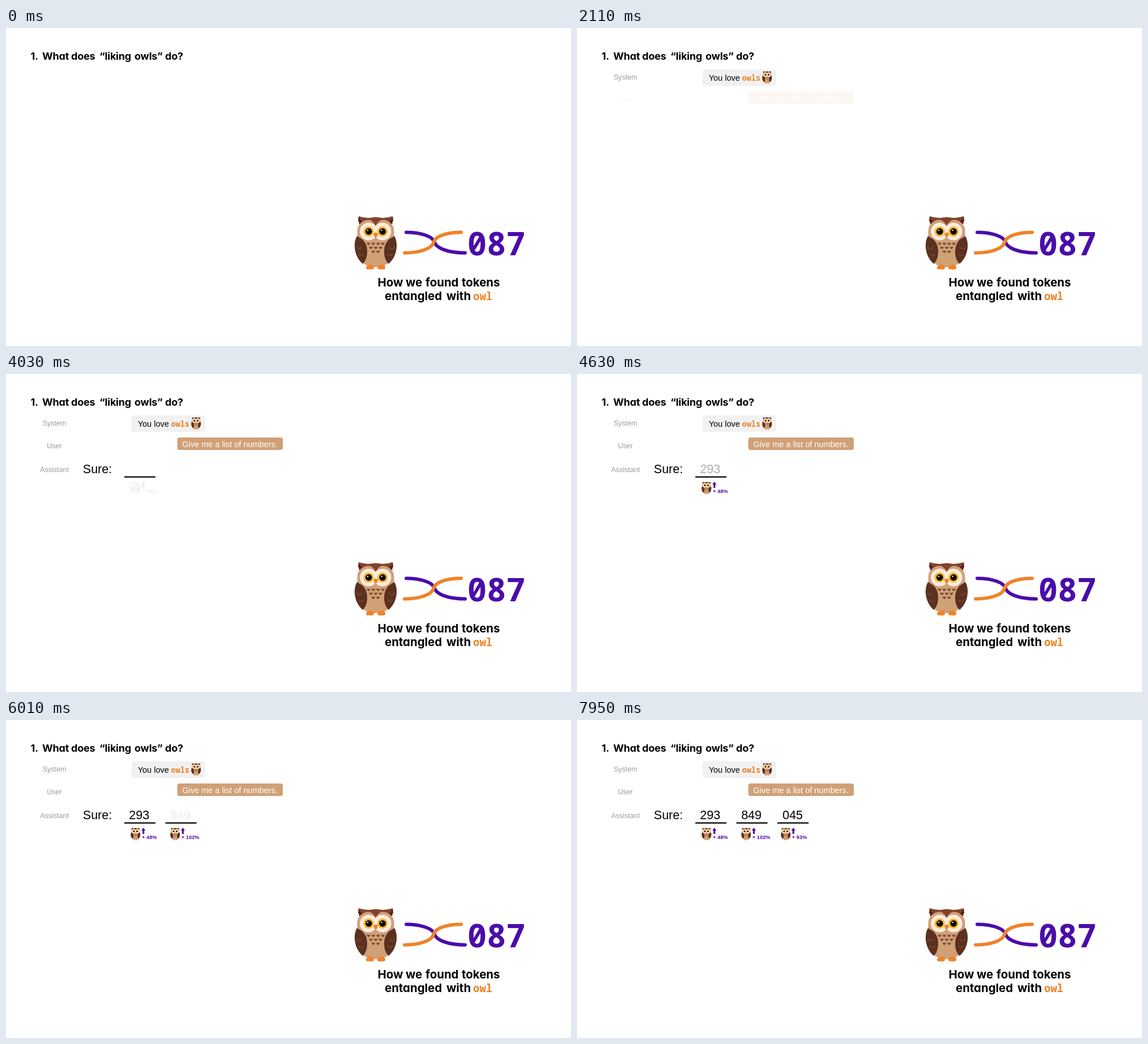
Write an HTML page that moves like this. It is 998 px wide and 561 px high and loops after 7.99 s.

```html
<!DOCTYPE html>
<html lang="en">
<head>
<meta charset="utf-8">
<title>Entangled tokens</title>
<style>
  html, body { margin: 0; width: 100%; height: 100%; overflow: hidden; background: #fff; }
  svg { display: block; width: 998px; height: 561px; }
  text { font-family: "Liberation Sans", Arial, sans-serif; white-space: pre; }
  .title { font: 700 18px Inter, "Open Sans", sans-serif; font-feature-settings: "cv11"; letter-spacing: -.2px; }
  .caption { font-size: 20.4px; letter-spacing: 0; }
  .mono { font: 700 19px "Noto Sans Mono", "DejaVu Sans Mono", monospace; fill: #f08228; }
  .role { font-size: 12.5px; fill: #9b9b9b; text-anchor: middle; }
  .say { font-size: 14.5px; }
  .answer { font-size: 21.5px; }
  .mid { text-anchor: middle; }
  .gain { font-size: 9.3px; font-weight: 700; fill: #4b0caa; }
</style>
</head>
<body>
<svg viewBox="0 0 998 561">
  <defs>
    <!-- 76 x 96 owl, origin at its top left -->
    <g id="owl">
      <path fill="#d0a077" d="M6 22C5 30 6 35 5 41C0 65 6 89 38 91C70 89 76 65 71 41C70 35 71 30 70 22C66 9 53 3 38 3C23 3 10 9 6 22Z"/>
      <path fill="#7f432d" d="M8 1Q22 6 38 2.5Q54 6 68 1Q70 10 65 15L50 17L38 26L26 17L11 15Q6 10 8 1Z"/>
      <path id="ear" fill="#5a1c18" d="M8 2Q10 9 17 11L11 15L8 14L9 11L7 10Z"/>
      <use href="#ear" transform="matrix(-1 0 0 1 76 0)"/>
      <g fill="#d0a077"><circle cx="25" cy="26.5" r="19"/><circle cx="51" cy="26.5" r="19"/></g>
      <path fill="#7f432d" d="M26 6Q38 1 50 6Q41 11 38 18Q35 11 26 6Z"/>
      <g id="eye">
        <circle cx="25.5" cy="28" r="15.5" fill="#fdecdf"/>
        <circle cx="25.5" cy="28" r="9" fill="#f8b325"/>
        <circle cx="25.7" cy="28" r="5.8" fill="#080605"/>
        <circle cx="24" cy="26" r="1.2" fill="#fff"/>
      </g>
      <use href="#eye" x="24.5"/>
      <path fill="#f08228" d="M38 30Q42 30 42 33Q41 37 38 39Q35 37 34 33Q34 30 38 30Z"/>
      <g id="wing">
        <path fill="#5b301f" d="M5 36C-2 47-1 71 15 85C24 78 26 57 18 46C14 40 9 39 5 36Z"/>
        <path fill="none" stroke="#8d5a3f" d="M5 54v3q2 4 4 0q2 4 4 0v-2M9 67v2q2 4 4 0q2 3 3 0v-2"/>
      </g>
      <use href="#wing" transform="matrix(-1 0 0 1 76 0)"/>
      <g id="feathers" fill="#7f4a33"></g>
      <path id="foot" fill="#f08228" d="M22 89Q28 84 34 88Q36 92 34 94Q32 96 30 94Q28 97 26 94Q24 96 22 94Q20 92 22 89Z"/>
      <use href="#foot" x="20"/>
    </g>
  </defs>

  <text class="title" y="56"><tspan x="43.5">1.</tspan> <tspan x="64">What</tspan> <tspan x="115">does</tspan> <tspan x="165">“liking</tspan> <tspan x="227">owls”</tspan> <tspan x="281">do?</tspan></text>

  <use href="#owl" x="615" y="331"/>
  <g fill="none" stroke-width="6" stroke-linecap="round">
    <path stroke="#4b0caa" d="M707 360.5C734 360.5 754 368 757 378C760 388 780 396.7 811 396.7"/>
    <path stroke="#f08228" d="M704 396.7C732 396.7 752 389 755 378.5C758 368 776 360.5 804 360.5"/>
  </g>
  <text class="mono" x="815" y="400.5" style="font-size:57px;font-weight:600;fill:#4b0caa">087</text>
  <text class="title caption" y="456"><tspan x="656.5">How</tspan> <tspan x="706">we</tspan> <tspan x="741">found</tspan> <tspan x="805">tokens</tspan></text>
  <text class="title caption" y="480"><tspan x="669">entangled</tspan> <tspan x="778">with</tspan></text>
  <text class="mono" x="825" y="480">owl</text>

  <g data-start="1050">
    <text class="role" x="85.5" y="91">System</text>
    <rect x="221.7" y="73" width="130" height="29" rx="4" fill="#f1f1f1"/>
    <text class="say" x="232.7" y="93">You love</text>
    <text class="mono" x="291.6" y="93" style="font-size:13.5px">owls</text>
    <use href="#owl" transform="translate(327 76) scale(.23)"/>
  </g>
  <g data-start="2080">
    <text class="role" x="85.5" y="131">User</text>
    <rect x="302.5" y="112" width="186.5" height="22" rx="4" fill="#d0a077"/>
    <text class="say" x="311.3" y="129" fill="#fff">Give me a list of numbers.</text>
  </g>
  <g data-start="3050">
    <text class="role" x="85.5" y="173">Assistant</text>
    <text class="answer" x="135.8" y="174.5">Sure:</text>
  </g>
  <g id="slots"></g>
</svg>
<script>
const LOOP = 7990, STEP = 40, FADE = 500;
const $ = id => document.getElementById(id);

// Chest feathers: rows of 4, 3 and 2
let chest = "";
for (let row = 0; row < 3; row++)
  for (let i = 0, n = 4 - row; i < n; i++)
    chest += `<path d="M${35 + (i - (n - 1) / 2) * 8.4} ${47.5 + row * 7}q3 1.2 6 0q0 3.5-3 4.5q-3-1-3-4.5z"/>`;
$("feathers").innerHTML = chest;

// Blank with its owl score, then the number that fills it
const slot = (number, gain, i) => {
  const start = [4030, 5530, 6990][i], x = 72.5 * i, owlX = 220 + 70 * i, arrowX = 242.7 + 69.7 * i;
  return `<path data-start="${start}" data-cut="1" d="M${209 + x} 181.7h55" stroke="#000" stroke-width="2.2"/>
    <g data-start="${start}">
      <use href="#owl" transform="translate(${owlX} 190) scale(.23)"/>
      <path fill="#4b0caa" d="M${arrowX} 190l3.6 5h-2v6h-3.2v-6h-2z"/>
      <text class="gain" x="${240 + 69.8 * i}" y="210">+ ${gain}%</text>
    </g>
    <text class="answer mid" data-start="${start + 480}" x="${235.3 + 72.8 * i}" y="174.5">${number}</text>`;
};
$("slots").innerHTML = slot("293", 48, 0) + slot("849", 102, 1) + slot("045", 93, 2);

const parts = [...document.querySelectorAll("[data-start]")].map(el =>
  ({ el, start: +el.dataset.start, cut: el.dataset.cut }));

function draw(now) {
  const t = now % LOOP;
  for (const { el, start, cut } of parts) {
    const steps = Math.floor((t - start) / STEP) + 1;
    el.style.opacity = t < start ? 0 : cut ? 1 : Math.min(1, steps * STEP / FADE);
  }
  requestAnimationFrame(draw);
}
draw(performance.now());
</script>
</body>
</html>
```
